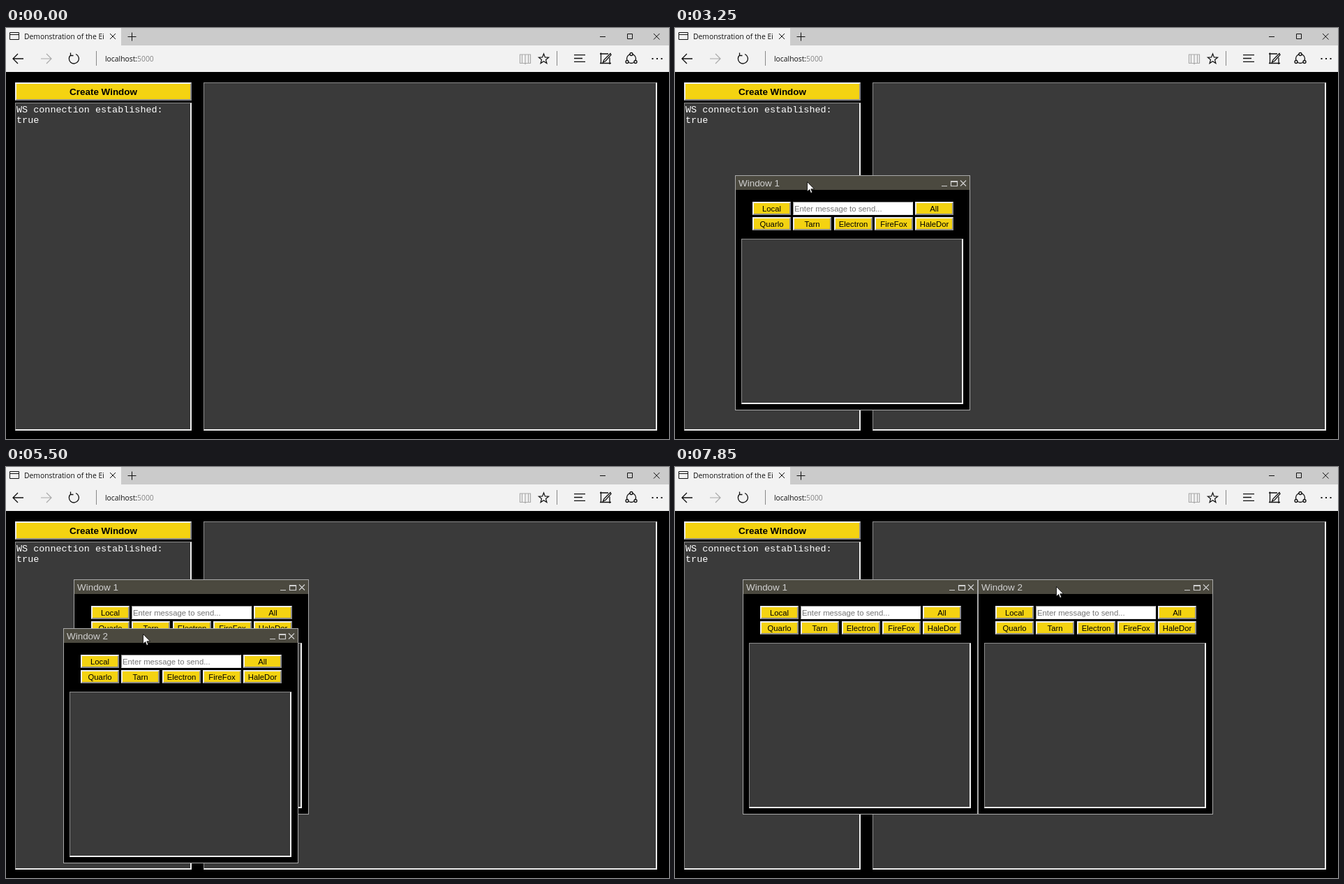
An HTML page that plays this animation: 950x589 px, repeating every 8 s.

```html
<!DOCTYPE html>
<html lang="en">
<head>
<meta charset="utf-8">
<title>Window docking demo</title>
<style>
html, body { margin: 0; width: 100%; height: 100%; overflow: hidden; background: #000; }
#stage { position: relative; width: 950px; height: 589px; overflow: hidden; background: #000; }
#stage * { position: absolute; box-sizing: border-box; }
#bar { left: 0; top: 0; }
.panel { background: #3a3a3a; border: solid; border-width: 1px 2px 2px 1px; border-color: #8c8c8c #eee #eee #8c8c8c; }
.btn { background: #f4d311; border: 2px solid; border-color: #eee #8c8c8c #8c8c8c #eee; color: #000;
  display: flex; align-items: center; justify-content: center; white-space: nowrap;
  font: 11.3px "Liberation Sans", Arial, sans-serif; }
#create { left: 13px; top: 78px; width: 253px; height: 26px; font-size: 13.45px; font-weight: bold; }
#create.down { border-color: #8c8c8c #eee #eee #8c8c8c; padding: 1px 0 0 1px; }
#log { left: 13px; top: 107px; width: 253px; height: 470px; padding: 2px 1px; color: #fff; white-space: pre;
  font: 13.45px/15px "Liberation Mono", "Courier New", monospace; }
#desk { left: 283px; top: 78px; width: 650px; height: 499px; }
.win { left: 0; top: 0; width: 337px; height: 337px; background: #000; box-shadow: inset 0 0 0 1px #a9a9a9; }
.head { left: 1px; top: 1px; width: 335px; height: 20px; padding-left: 4px; background: #4b493f; color: #d0d0d0;
  font: 13.45px/21px "Liberation Sans", Arial, sans-serif; }
.head svg { left: 294px; top: 5px; }
.input { left: 83px; top: 38px; width: 172px; height: 19px; padding-left: 1px; background: #fff; color: #757575;
  border: solid; border-width: 1px; border-color: #8c8c8c #eee #eee #8c8c8c;
  font: 11.3px/18px "Liberation Sans", Arial, sans-serif; }
.win .panel { left: 9px; top: 91px; width: 318px; height: 237px; }
</style>
</head>
<body>
<div id="stage">
  <svg id="bar" width="950" height="63" fill="none" stroke="#111" font-family="'Open Sans', sans-serif" font-size="10.35">
    <g stroke="none">
      <path fill="#cbcbcb" d="M0 0H950V25H0z"/>
      <path fill="#f2f2f2" d="M0 0H165V25H950V63H0z"/>
      <text x="26" y="16" fill="#111">Demonstration of the Ei</text>
      <text x="142" y="48" fill="#111">localhost:<tspan fill="#858585">5000</tspan></text>
    </g>
    <path d="M5.5 6.5h13v10h-13zM5.5 9.5h13M149 8l8 8m0-8l-8 8M174.500 12.500h12m-6-6v12
      M851 12.500h8M890.500 8.500h7v7h-7zM928 8l8.500 8.500m0-8.500l-8.500 8.500"/>
    <path stroke-width="1.3" d="M25 44H10m7-7l-7 7l7 7M93 38.500a7 7 0 1 0 7-1M92.500 35.500v4h4
      M814 38.700h16M814 43.500h12M814 48.300h16"/>
    <path stroke="#aaa" stroke-width="1.2" d="M50 44h15m-7-7l7 7l-7 7M744 38v14M744 38h-7.500v12.500h6.500l1 1l1-1h6.500v-12.500zM739.500 38v12M748.500 38v12"/>
    <path stroke="#888" d="M129.500 33v21M789.500 33v21"/>
    <path id="star" stroke-width="1.2"/>
    <path stroke-width="1.3" d="M863 37h-10.500v13.500h12.500v-8M866 36.500l-9 9l-1.500 3.500l3.500-1.500l8-9zM851 37h3M852.500 35.500v3M851 50.500h3M863 50.500h4M865 49v3"/>
    <g stroke-width="1.3">
      <circle cx="896" cy="44" r="6.500"/>
      <g fill="#f2f2f2"><circle cx="896" cy="37.500" r="2"/><circle cx="890" cy="48.500" r="2"/><circle cx="902" cy="48.500" r="2"/></g>
    </g>
    <path stroke-width="2" d="M925.500 44h2M932 44h2M938.500 44h2"/>
  </svg>
  <div id="create" class="btn">Create Window</div>
  <div id="log" class="panel">WS connection established:
true</div>
  <div id="desk" class="panel"></div>
  <svg id="cursor" style="left:0;top:0" width="12" height="18">
    <path d="M.5 .5V14.500L3.700 11.500L5.600 16.500L7.800 15.600L5.800 10.800H10.500z" fill="#fff" stroke="#000" stroke-width=".8"/>
  </svg>
</div>
<script>
const $ = id => document.getElementById(id);
const stage = $('stage'), cursor = $('cursor'), create = $('create');

$('star').setAttribute('d', 'M' + Array.from({ length: 10 }, (_, i) => {
  const r = i % 2 ? 3.2 : 7.5, a = i * Math.PI / 5;
  return (770.5 + r * Math.sin(a)).toFixed(1) + ' ' + (44.5 - r * Math.cos(a)).toFixed(1);
}).join('L') + 'z');

const button = (label, col, top) =>
  `<div class="btn" style="left:${Math.round(25 + col * 58.3)}px;top:${top}px;width:55px;height:19px">${label}</div>`;

function makeWindow(n) {
  const win = document.createElement('div');
  win.className = 'win';
  win.innerHTML = `<div class="head">Window ${n}<svg width="40" height="12" fill="none" stroke="#d0d0d0">
    <path d="M1 9.500h8M14.500 2.500h9v7h-9zM14 2.500h10M14 3.500h10M28 1.500l8 8m0-8l-8 8" stroke-width="1.2"/></svg></div>
    <div class="input">Enter message to send...</div><div class="panel"></div>`
    + button('Local', 0, 38) + button('All', 4, 38)
    + ['Quarlo', 'Tarn', 'Electron', 'FireFox', 'HaleDor'].map((s, i) => button(s, i, 60)).join('');
  stage.insertBefore(win, cursor);
  return win;
}
const win1 = makeWindow(1), win2 = makeWindow(2);

// Pointer moves: first step, last step, step count, way points
const moves = [
  [700, 700, 1, [776, 507]],
  [778, 1480, 10, [470, 315], [265, 160], [188, 96]],
  [1560, 1560, 1, [187, 91]],
  [2020, 2550, 8, [187, 165], [185, 240]],
  [3100, 3560, 7, [200, 170]],
  [3870, 4020, 3, [209, 90]],
  [4810, 5500, 10, [300, 115], [341, 170], [260, 225], [180, 236], [196, 239]],
  [6110, 6505, 6, [235, 246], [325, 238], [418, 217]],
  [6590, 6900, 5, [470, 200], [500, 189]],
  [6980, 6980, 1, [508, 184]],
  [7058, 7370, 5, [535, 175]],
  [7540, 7690, 3, [545, 171]],
  [7850, 7850, 1, [546, 171]]
];

function along(points, p) {
  const s = p * (points.length - 1), i = Math.min(Math.floor(s), points.length - 2);
  return points[i].map((v, k) => Math.round(v + (points[i + 1][k] - v) * (s - i)));
}

function pointer(t) {
  let pos = [776, 507];
  for (const [from, to, n, ...points] of moves) {
    if (t < from) break;
    const step = n > 1 ? Math.min(n, Math.floor((t - from) * (n - 1) / (to - from) + 1.001)) : 1;
    pos = along([pos, ...points], step / n);
  }
  return pos;
}

function place(el, [x, y], visible) {
  el.style.transform = `translate(${x}px,${y}px)`;
  el.style.visibility = visible ? 'visible' : 'hidden';
}

function dragged(t, start, end, [dx, dy]) {
  if (t < start) return [82, 231];
  const [x, y] = pointer(Math.min(t, end));
  return [x - dx, y - dy];
}

function draw() {
  const t = performance.now() % 8000;
  place(cursor, pointer(t), t >= 700);
  place(win1, dragged(t, 3100, 3560, [103, 9]), t >= 1870);
  // The second window snaps to the side of the first
  place(win2, t >= 7690 ? [434, 161] : dragged(t, 6110, 7690, [114, 8]), t >= 4640);
  create.classList.toggle('down', t >= 1710 && t < 1790 || t >= 4400 && t < 4570);
  requestAnimationFrame(draw);
}
draw();
</script>
</body>
</html>
```
